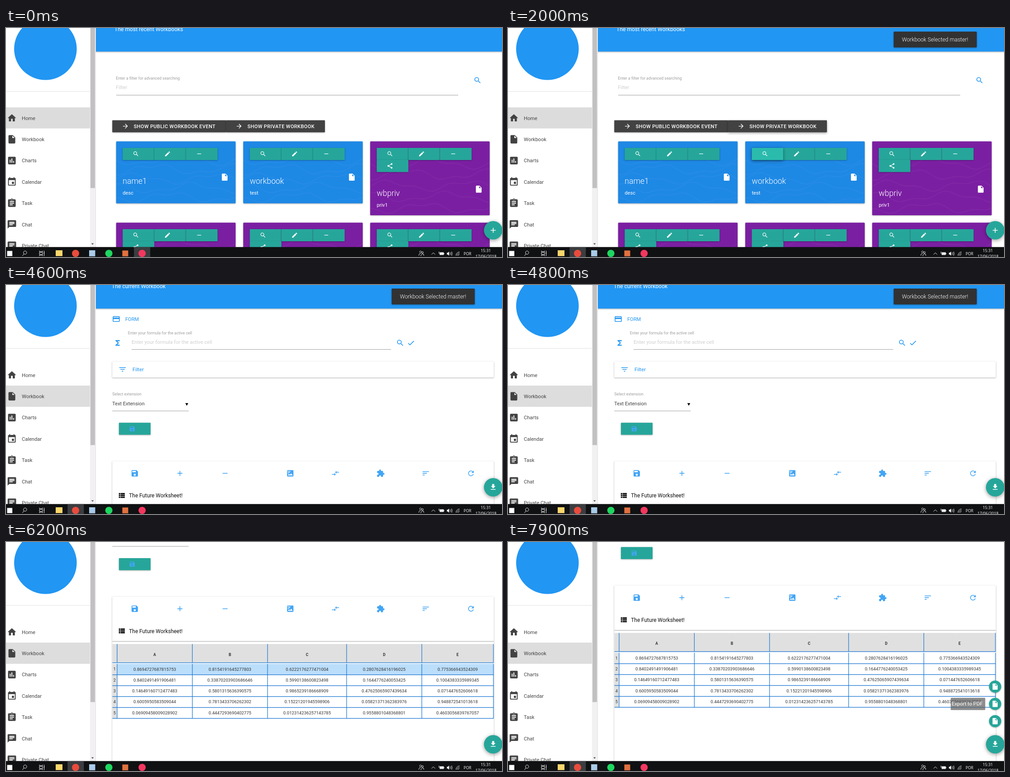
Recreate the animation shown at these times as an HTML page. Size 1098 px wide and 510 px high, loop 8 s.

```html
<!DOCTYPE html>
<html lang="en">
<head>
<meta charset="utf-8">
<title>Workbook demo</title>
<style>
html, body { margin: 0; width: 100%; height: 100%; overflow: hidden; background: #fff; }
svg { display: block; }
text { font-family: Roboto, sans-serif; white-space: pre; }
.sys text { font-family: "Open Sans", "Noto Sans", sans-serif; }
.s1 { filter: drop-shadow(0 1.5px 1.5px rgba(0,0,0,.32)); }
.s2 { filter: drop-shadow(0 2px 4px rgba(0,0,0,.4)); }
</style>
</head>
<body>
<svg id="stage" width="1098" height="510" viewBox="0 0 1098 510"></svg>
<script>
const BLUE = '#2196f3', SKY = '#42a5f5', TEAL = '#26a69a', PURPLE = '#7b1fa2', INK = '#424242';

// 24 x 24 icon outlines
const ICONS = {
  search: 'M15.5 14h-.8l-.3-.3A6.5 6.5 0 1 0 13.7 14.4l.3.3v.8l5 5 1.5-1.5zm-6 0a4.5 4.5 0 1 1 0-9 4.5 4.5 0 0 1 0 9z',
  edit: 'M3 17.25V21h3.75L17.8 9.94l-3.75-3.75zM20.7 7.04c.4-.4.4-1 0-1.4l-2.34-2.35c-.4-.4-1-.4-1.4 0l-1.83 1.83 3.75 3.75z',
  minus: 'M19 13H5v-2h14z',
  plus: 'M19 13h-6v6h-2v-6H5v-2h6V5h2v6h6z',
  share: 'M18 2a3 3 0 1 1-.1 0zM6 9a3 3 0 1 1-.1 0zM18 16a3 3 0 1 1-.1 0zM6 11l12-7 1 1.7L8.2 12 19 18.3l-1 1.7-12-7z',
  home: 'M10 20v-6h4v6h5v-8h3L12 3 2 12h3v8z',
  file: 'M6 2a2 2 0 0 0-2 2v16c0 1.1.9 2 2 2h12a2 2 0 0 0 2-2V8l-6-6zm7 7V3.5L18.5 9z',
  chart: 'M19 3H5a2 2 0 0 0-2 2v14c0 1.1.9 2 2 2h14a2 2 0 0 0 2-2V5a2 2 0 0 0-2-2zM9 17H7v-7h2zm4 0h-2V7h2zm4 0h-2v-4h2z',
  event: 'M17 12h-5v5h5zM16 1v2H8V1H6v2H5a2 2 0 0 0-2 2v14c0 1.1.9 2 2 2h14a2 2 0 0 0 2-2V5a2 2 0 0 0-2-2h-1V1zm3 18H5V8h14z',
  task: 'M19 3h-4.2a3 3 0 0 0-5.6 0H5a2 2 0 0 0-2 2v14c0 1.1.9 2 2 2h14a2 2 0 0 0 2-2V5a2 2 0 0 0-2-2zm-7 0a1 1 0 1 1 0 2 1 1 0 0 1 0-2zm2 14H7v-2h7zm3-4H7v-2h10zm0-4H7V7h10z',
  chat: 'M20 2H4a2 2 0 0 0-2 2v18l4-4h14a2 2 0 0 0 2-2V4a2 2 0 0 0-2-2zM6 9h12v2H6zm8 5H6v-2h8zm4-6H6V6h12z',
  arrow: 'M12 4l-1.4 1.4 5.6 5.6H4v2h12.2l-5.6 5.6L12 20l8-8z',
  card: 'M20 4H4a2 2 0 0 0-2 2v12c0 1.1.9 2 2 2h16a2 2 0 0 0 2-2V6a2 2 0 0 0-2-2zm0 14H4v-6h16zm0-10H4V6h16z',
  sigma: 'M18 4H6v2l6.5 6L6 18v2h12v-3h-7l5-5-5-5h7z',
  check: 'M9 16.2L4.8 12l-1.4 1.4L9 19 21 7l-1.4-1.4z',
  filter: 'M10 18h4v-2h-4zM3 6v2h18V6zm3 7h12v-2H6z',
  save: 'M17 3H5a2 2 0 0 0-2 2v14c0 1.1.9 2 2 2h14a2 2 0 0 0 2-2V7zm-5 16a3 3 0 1 1 0-6 3 3 0 0 1 0 6zm3-10H5V5h10z',
  image: 'M19 3H5a2 2 0 0 0-2 2v14c0 1.1.9 2 2 2h14a2 2 0 0 0 2-2V5a2 2 0 0 0-2-2zM5 5h3a3 3 0 0 1-3 3zM5 12v-2a5 5 0 0 0 5-5h2a7 7 0 0 1-7 7zm0 6l3.5-4.5 2.5 3 3.5-4.5 4.5 6z',
  swap: 'M9 14H2v2h7v3l4-4-4-4zm6-1v-3h7V8h-7V5l-4 4z',
  puzzle: 'M20.5 11H19V7a2 2 0 0 0-2-2h-4V3.5a2.5 2.5 0 0 0-5 0V5H4a2 2 0 0 0-2 2v3.8h1.5a2.7 2.7 0 0 1 0 5.4H2V20c0 1.1.9 2 2 2h3.8v-1.5a2.7 2.7 0 0 1 5.4 0V22H17a2 2 0 0 0 2-2v-4h1.5a2.5 2.5 0 0 0 0-5z',
  sort: 'M3 18h6v-2H3zM3 6v2h18V6zm0 7h12v-2H3z',
  refresh: 'M17.65 6.35A8 8 0 1 0 19.73 14h-2.08A6 6 0 1 1 16.22 7.78L13 11h7V4z',
  list: 'M4 14h4v-4H4zm0 5h4v-4H4zM4 9h4V5H4zm5 5h12v-4H9zm0 5h12v-4H9zM9 5v4h12V5z',
  download: 'M19 9h-4V3H9v6H5l7 7zM5 18v2h14v-2z'
};

// cx, cy give the centre of an icon; text is placed by its cap-height centre
const icon = (name, cx, cy, size, fill) =>
  `<path d="${ICONS[name]}" fill="${fill}" transform="translate(${cx - size / 2} ${cy - size / 2}) scale(${size / 24})"/>`;
const rect = (x, y, w, h, fill, more = '') =>
  `<rect x="${x}" y="${y}" width="${w}" height="${h}" fill="${fill}" ${more}/>`;
const circle = (x, y, r, fill, more = '') => `<circle cx="${x}" cy="${y}" r="${r}" fill="${fill}" ${more}/>`;
const text = (x, cy, size, str, fill, more = '') =>
  `<text x="${x}" y="${cy + size * .355}" font-size="${size}" fill="${fill}" ${more}>${str}</text>`;
const group = (id, body, more = '') => `<g id="${id}" ${more}>${body}</g>`;
const MID = 'text-anchor="middle"';

function header(x, title) {
  return rect(198, -10, 900, 62.5, BLUE, 'class="s1"') + text(x, 2.6, 12.15, title, '#fff');
}

function darkButton(id, x, w, label) {
  return rect(x, 205.5, w, 26.8, INK, `id="${id}" class="s1" rx="1"`) +
    icon('arrow', x + 29, 218.6, 16, '#fff') +
    text(x + 47.5, 218.8, 11, label, '#fff', 'font-weight="500" letter-spacing=".37"');
}

function tealButton(x, y, name) {
  return rect(x, y, 70, 27, TEAL, 'class="s1" rx="1"') + icon(name, x + 29.3, y + 13.3, 14.8, '#fff');
}

function contours(x, y, h) {
  let d = '';
  for (let k = 0; k < 5; k++) {
    for (let i = 0; i <= 44; i++) {
      const py = y + h * (.3 + k * .15) + 9 * Math.sin(i * .21 + k * 1.7) + 4 * Math.sin(i * .53 + k);
      d += `${i ? 'L' : 'M'}${x + i * 6} ${Math.min(py, y + h).toFixed(1)}`;
    }
  }
  return `<path d="${d}" fill="none" stroke="#fff" stroke-opacity=".07"/>`;
}

function workCard(x, y, shared, name, desc) {
  const h = shared ? 164.5 : 138, low = shared ? 26.7 : 0;
  return rect(x, y, 264.5, h, shared ? PURPLE : '#1e88e5', 'class="s1" rx="1.5"') + contours(x, y, h) +
    ['search', 'edit', 'minus'].map((n, i) => tealButton(x + 14.5 + i * 70, y + 14.5, n)).join('') +
    (shared ? tealButton(x + 14.5, y + 41.3, 'share') : '') +
    text(x + 14.5, y + 88.3 + low, 17.6, name, '#fff', 'font-weight="300"') +
    text(x + 14.5, y + 114.5 + low, 11.1, desc, '#fff') +
    icon('file', x + 240.3, y + 79.7 + low, 19, '#fff');
}

function homePage() {
  const xs = [243.8, 525.2, 806.2];
  return header(240, 'The most recent Workbooks') +
    text(243.3, 112.3, 8.85, 'Enter a filter for advanced searching', '#9e9e9e') +
    text(243.3, 132.3, 11.2, 'Filter', '#cfcfcf') +
    rect(244, 149, 757, 1, '#9e9e9e') + icon('search', 1044, 116.5, 18.6, BLUE) +
    darkButton('pub', 235.3, 251.7, 'SHOW PUBLIC WORKBOOK EVENT') +
    darkButton('priv', 487, 219, 'SHOW PRIVATE WORKBOOK') +
    workCard(xs[0], 252.5, false, 'name1', 'desc') +
    workCard(xs[1], 252.5, false, 'workbook', 'test') +
    workCard(xs[2], 252.5, true, 'wbpriv', 'priv1') +
    group('pick', rect(539.7, 267, 69.6, 27, '#2bbbad', 'rx="1"') + icon('search', 569, 280.3, 14.8, '#fff')) +
    xs.map(x => workCard(x, 433.6, true, '', '')).join('');
}

const COLS = [246, 412.5, 579, 754, 920.5, 1079];
const CELLS = `0.8694727687815753 0.8154191645277803 0.6222176277471004 0.2807628416196025 0.775366943524309
0.8402491491906481 0.33870203903686646 0.5990138600823498 0.1644776240053425 0.1004383335989345
0.14649160712477483 0.5801315636390575 0.9865239186668909 0.47625065907439634 0.071447652606618
0.6005950583509044 0.7813433706262302 0.15221201945598906 0.05821371362383976 0.948872541013618
0.06909458009028902 0.4447293690402775 0.012314236257143785 0.9558801048368801 0.4603056839767057`
  .split('\n').map(r => r.split(' '));
const ROW = 24.3, TOP = 542.2, LINE = '#1976d2';

function table() {
  const mid = i => (COLS[i] + COLS[i + 1]) / 2;
  let s = rect(235.5, 498, 843.5, 41.5, '#e0e0e0') + rect(235.5, TOP, 10.5, ROW * 5, '#e0e0e0');
  CELLS.forEach((cells, r) => {
    const y = TOP + r * ROW, cy = y + 11.7;
    s += rect(246, y, 833, ROW, '#bbdefb', `id="row${r}" opacity="0"`) +
      text(240.3, cy, 9.3, r + 1, '#333', MID) +
      cells.map((c, i) => text(mid(i), cy, 9.65, c, '#333', MID)).join('') +
      rect(235.5, y + ROW - .7, 844, 1.3, LINE);
  });
  COLS.forEach((x, i) => {
    s += rect(x - .6, 498, 1.2, 41.5, LINE) + rect(x - .6, TOP, 1.2, ROW * 5, LINE);
    if (i < 5) s += text(mid(i), 521.3, 8.6, 'ABCDE'[i], '#333', MID + ' font-weight="700"');
  });
  return s + rect(235.5, 539, 844, 1.3, LINE);
}

function bookPage() {
  const tools = ['save', 'plus', 'minus', 'image', 'swap', 'puzzle', 'sort', 'refresh'];
  const toolX = i => 285 + i * 100 + (i > 2 ? 44.3 : 0);
  return header(234, 'The current Workbook') +
    icon('card', 244, 75.8, 18.6, BLUE) + text(264, 75.8, 11, 'FORM', BLUE) +
    text(269.8, 107, 8.85, 'Enter your formula for the active cell', '#9e9e9e') +
    text(278, 126.6, 11.1, 'Enter your formula for the active cell', '#cfcfcf') +
    rect(278, 143, 574.5, 1, '#9e9e9e') +
    icon('sigma', 247, 129, 18.6, BLUE) + icon('search', 872.7, 129, 18.6, BLUE) + icon('check', 896.5, 129, 18.6, BLUE) +
    rect(235.3, 170.3, 844.5, 35.7, '#fff', 'class="s1"') +
    icon('filter', 258, 188, 19, BLUE) + text(280, 188, 11.2, 'Filter', BLUE) +
    text(235.3, 243.3, 8.85, 'Select extension', '#9e9e9e') +
    text(235.3, 263.6, 11, 'Text Extension', '#424242') +
    '<path d="M397 263h6.4l-3.2 6z" fill="#000"/>' + rect(235.3, 280, 169, 1, '#9e9e9e') +
    rect(250, 306.8, 70, 26.8, TEAL, 'class="s1" rx="1"') + icon('save', 279.3, 320.3, 14.8, SKY) +
    rect(235.3, 392.3, 844.5, 500, '#fff', 'class="s1"') +
    rect(235.3, 491.2, 844.5, 2.2, '#d0d0d0') +
    tools.map((n, i) => icon(n, toolX(i), 419.4, 18.8, SKY)).join('') +
    icon('list', 256, 468.8, 18.8, '#111') + text(272.3, 469.2, 11.85, 'The Future Worksheet!', '#111') +
    table();
}

function sidebar() {
  const items = [['home', 'Home'], ['file', 'Workbook'], ['chart', 'Charts'], ['event', 'Calendar'],
    ['task', 'Task'], ['chat', 'Chat'], ['chat', 'Private Chat']];
  return rect(0, 0, 198, 488, '#fff') + circle(87.3, 46.5, 69.3, BLUE) +
    rect(0, 140.7, 186, 1, '#e0e0e0') +
    rect(0, 176.7, 186, 47, '#dcdcdc', 'id="homeBg"') + rect(0, 224, 186, 47.3, '#dddddd', 'id="bookBg"') +
    circle(65, 248, 64, '#000', 'id="ripple" clip-path="url(#bookClip)"') +
    items.map(([n, label], i) => icon(n, 13, 200.4 + i * 47.4, 22.6, INK) +
      text(35, 200.6 + i * 47.4, 11.1, label, '#444')).join('') +
    rect(186, 0, 12, 488, '#f1f1f1') + rect(187, 0, 10, 356.5, '#c1c1c1') +
    '<path d="M188.8 479.5h5.6l-2.8 3.2z" fill="#505050"/>' + rect(198, 0, 1, 488, '#e4e0ea');
}

function taskbar() {
  const line = (d, w = 1) => `<path d="${d}" fill="none" stroke="#eee" stroke-width="${w}"/>`;
  return rect(0, 487.8, 1098, 23, '#101113') +
    rect(283.3, 487.8, 36, 23, '#3b3d40', 'id="tabA"') + rect(136.3, 487.8, 36, 23, '#3b3d40', 'id="tabB"') +
    rect(2.5, 496.5, 11.5, 11.5, '#fff') +
    line('M46 500.3a3.7 3.7 0 1 1 0-.1M39.8 503l-3.4 4.5') +
    line('M74 496v2h7v-2M74 508v-2h7v2M74 499.7h7v4.6h-7zM84.5 496v12M83.3 501h2.4') +
    rect(110, 495, 15, 13, '#fbd66b') + circle(154, 502, 8, '#ea4b3c') +
    rect(184, 495, 13.5, 13.5, '#a9cbe9') + circle(227.7, 502, 8, '#1ed760') +
    rect(257.5, 495.5, 13, 13, '#e2713f') + circle(301.3, 502, 8, '#f5375f') +
    line('M917.5 500.5a2 2 0 1 1 .1 0M914 507q0-5 4-5M922 498a2 2 0 1 1-.1 0M918.5 508q0-5 3.5-5t3 4') +
    line('M942 504.5l4-4 4 4') +
    rect(960, 499.5, 9, 6, '#eee') + line('M958.5 498v5M969.8 501v3') +
    '<path d="M976 500.5h2l3-2.5v9l-3-2.5h-2z" fill="#eee"/>' +
    line('M982.8 500.5q1.4 2 0 4M984.6 499q2.4 3.5 0 7M986.5 497.8q3 4.7 0 9.4', .8) +
    line('M996 507a8.5 8.5 0 0 1 8-8.5M998.6 507a6 6 0 0 1 5.4-5.8M1001 507a3 3 0 0 1 3-3', .9) +
    text(1013, 502.6, 8.6, 'POR', '#fff') + text(1062, 495.6, 8.8, '15:31', '#fff', MID) +
    text(1062.5, 509.2, 8.8, '17/06/2018', '#fff', MID);
}

const FABS = [399, 360.5, 322];
const stage = document.getElementById('stage');
stage.innerHTML =
  '<clipPath id="bookClip"><rect y="224" width="186" height="47.3"/></clipPath>' +
  rect(0, 0, 1098, 510, '#fff') + group('home', homePage()) + group('book', bookPage()) + sidebar() +
  FABS.map((y, i) => group('mini' + i, circle(0, 0, 13.5, TEAL, 'class="s1"') + icon('file', 0, 0, 17, '#fff'))).join('') +
  group('tip', rect(980, 347, 76.5, 27.3, '#616161', 'rx="1.5" opacity=".72"') +
    text(982.3, 360.3, 11.2, 'Export to PDF', '#fff')) +
  circle(1078.5, 450.5, 20.5, TEAL, 'class="s2"') +
  group('fabPlus', icon('plus', 1078.5, 450.5, 19, '#fff')) +
  group('fabDown', icon('download', 1078.5, 450, 18, '#fff')) +
  group('toast', rect(853.7, 8, 184, 35.2, '#323232', 'class="s1" rx="1.5"') +
    text(872, 25.8, 12.2, 'Workbook Selected master!', '#fff', 'font-weight="300"')) +
  group('status', '<path d="M-2 471.7h367q3 0 3 3v14H-2z" fill="#f3f3f3" stroke="#c8c8c8" stroke-width=".8"/>' +
    text(-2, 479.8, 8.3, '0.0.0.0:5151/tabloom/#daybook', '#5f6368'), 'class="sys"') +
  group('bar', taskbar(), 'class="sys"');

// Keys are [time, value, time, value, ...], joined linearly
const TRACKS = {
  privLift: [300, 0, 500, 1, 700, 1, 900, .5],
  pick: [700, 0, 900, 1, 2800, 1, 3000, .25],
  pickLift: [1400, 0, 1600, 1, 2800, 1, 3000, 0],
  toastIn: [1700, 0, 1800, .4, 1900, .8, 2000, 1],
  toastOut: [5500, 0, 5600, .3, 5700, .6, 5800, .84, 5900, 1],
  tab: [1700, 0, 1800, 1],
  hover: [3100, 0, 3200, .4, 3400, 1],
  status: [3200, 0, 3500, 1, 4200, 1, 4400, 0],
  rippleR: [3900, 20, 4000, 64, 4300, 140],
  rippleA: [3900, 0, 4000, .08, 4200, .08, 4400, 0],
  page: [4300, 0, 4400, 1],
  scroll: [4800, 0, 4900, 66, 5000, 185, 5100, 264.3, 5200, 270.8, 6600, 270.8, 6700, 280, 6800, 290, 6900, 295.5],
  row0: [6000, 0, 6200, 1, 6300, 1, 6400, 0],
  row1: [6300, 0, 6400, 1, 6500, 0],
  row4: [6400, 0, 6500, 1, 6600, 1, 6800, 0],
  mini0: [7100, 0, 7300, 1],
  mini1: [7200, 0, 7400, 1],
  mini2: [7300, 0, 7500, 1],
  tip: [7800, 0, 7900, 1]
};

function value(name, t) {
  const k = TRACKS[name];
  if (t <= k[0]) return k[1];
  for (let i = 2; i < k.length; i += 2) {
    if (t <= k[i]) return k[i - 1] + (k[i + 1] - k[i - 1]) * (t - k[i - 2]) / (k[i] - k[i - 2]);
  }
  return k[k.length - 1];
}

const el = id => document.getElementById(id);
const fade = (id, a) => {
  el(id).style.opacity = a;
  el(id).style.display = a > 0 ? '' : 'none';
};
const move = (id, x, y, s = 1) => el(id).setAttribute('transform', `translate(${x} ${y}) scale(${s})`);
const lift = (id, a) => {
  el(id).style.filter = `drop-shadow(0 ${1.5 + a}px ${1.5 + 2 * a}px rgba(0,0,0,${.32 + .1 * a}))`;
};

function draw(t) {
  const v = name => value(name, t), page = v('page');
  fade('home', 1 - page);
  fade('book', page);
  fade('fabPlus', 1 - page);
  fade('fabDown', page);
  move('book', 0, -v('scroll'));
  lift('priv', v('privLift'));
  lift('pick', v('pickLift'));
  for (const id of ['pick', 'status', 'row0', 'row1', 'row4', 'tip']) fade(id, v(id));
  fade('toast', v('toastIn') * (1 - v('toastOut')));
  move('toast', 0, 35 * (1 - v('toastIn')) - 30 * v('toastOut'));
  fade('tabA', 1 - v('tab'));
  fade('tabB', v('tab'));
  fade('homeBg', 1 - page);
  fade('bookBg', v('hover'));
  fade('ripple', v('rippleA'));
  el('ripple').setAttribute('r', v('rippleR'));
  FABS.forEach((y, i) => {
    const a = v('mini' + i);
    fade('mini' + i, a);
    move('mini' + i, 1078.3, y + 20 * (1 - a), .4 + .6 * a);
  });
}

const LOOP = 8000, STEP = 100, start = performance.now();
function tick() {
  const t = (performance.now() - start) % LOOP;
  draw(Math.floor(t / STEP) * STEP);
  requestAnimationFrame(tick);
}
tick();
</script>
</body>
</html>
```
